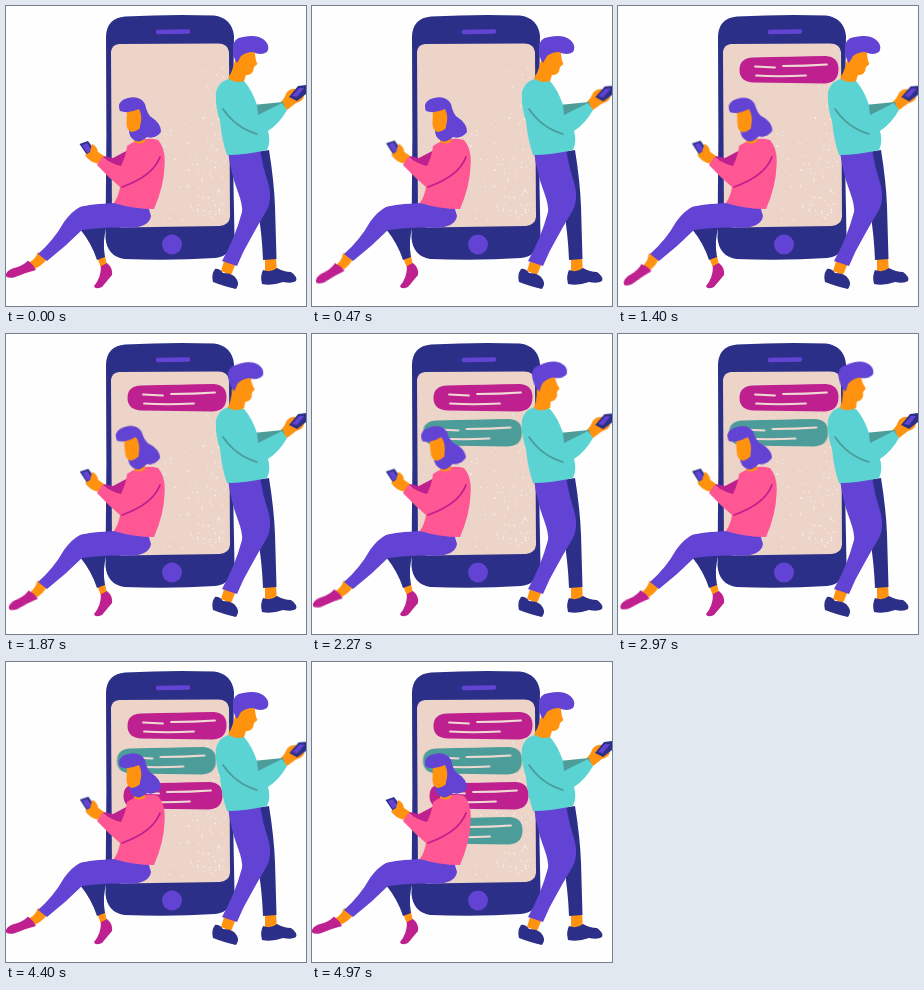
These frames come from a looping animation (300x300 px, 5010 ms). An HTML page:

```html
<!DOCTYPE html>
<html lang="en">
<head>
<meta charset="utf-8">
<title>Chatting by phone</title>
<style>
  html, body { margin: 0; width: 100%; height: 100%; overflow: hidden; background: #fefefe; }
  svg { display: block; width: 100vw; height: 100vh; }
  .navy { fill: #2c2f87; }
  .violet { fill: #6343d3; }
  .skin { fill: #ff930f; }
  .pink { fill: #ff5793; }
  .teal { fill: #5ad3d2; }
  .magenta { fill: #bf208f; }
  .sea { fill: #4c9d99; }
  .line { fill: none; stroke-linecap: round; stroke-linejoin: round; }
  .text { stroke: #f0d9d2; stroke-width: 1.8; }

  .move { animation: 5010ms ease-in-out infinite; }
  .foot { transform-origin: 36px 251px; animation-name: foot; }
  .her-head { transform-origin: 132px 133px; animation-name: herHead; }
  .his-head { transform-origin: 232px 74px; animation-name: hisHead; }
  .her-hands { transform-origin: 95px 155px; animation-name: type; animation-duration: 835ms; }
  .his-hands { transform-origin: 279px 101px; animation-name: type; animation-duration: 1002ms; }
  .bubble { animation: 5010ms ease-out infinite; transform-origin: 220px 64px; }
  .bubble.sea { transform-origin: 122px 64px; }
  .b1 { animation-name: pop1; }
  .b2 { animation-name: pop2; }
  .b3 { animation-name: pop3; }
  .b4 { animation-name: pop4; }

  @keyframes foot {
    0%, 87.8%, 100% { transform: rotate(0deg); }
    17.4% { transform: rotate(-19deg); }
    27.9% { transform: rotate(-15deg); }
    45.3% { transform: rotate(-3deg); }
    71.3% { transform: rotate(-10deg); }
  }
  @keyframes herHead {
    0%, 17.4%, 87.8%, 100% { transform: rotate(0deg); }
    27.9% { transform: rotate(-4deg); }
    45.3% { transform: rotate(-7deg); }
    71.3% { transform: rotate(-6deg); }
  }
  @keyframes hisHead {
    0%, 27.9%, 86%, 100% { transform: rotate(0deg); }
    43%, 56% { transform: rotate(-12deg); }
    71.3% { transform: rotate(-7deg); }
  }
  @keyframes type {
    0%, 100% { transform: rotate(0deg); }
    50% { transform: rotate(2deg); }
  }
  @keyframes pop1 { 0%, 14% { transform: scale(0); } 18.5%, 100% { transform: none; } }
  @keyframes pop2 { 0%, 39% { transform: scale(0); } 43.5%, 100% { transform: none; } }
  @keyframes pop3 { 0%, 64% { transform: scale(0); } 68.5%, 100% { transform: none; } }
  @keyframes pop4 { 0%, 89% { transform: scale(0); } 93.5%, 100% { transform: none; } }
</style>
</head>
<body>
<svg viewBox="0 0 300 300">
  <defs>
    <g id="bubble">
      <path d="M135 51.500Q175 50.500 208 50Q221 51 220.500 64Q220 76.500 207 77.500L136 76.500Q121.500 76 121.500 64Q121.500 52 135 51.500Z"/>
      <path class="line text" d="M137 60.500L157 61.500M165 60Q188 60 209 58.500M138 69.500Q160 71 188 69.500"/>
    </g>
  </defs>

  <!-- big phone -->
  <path class="navy" d="M100 30Q101 12 119 10.500Q165 8 208 9.500Q226 12 228 30Q226 130 228.500 230Q227 250 209 252Q165 255 118 253Q101 250 99.500 232Q101 130 100 30Z"/>
  <path fill="#ecd4c9" d="M105 46Q106 38.500 113 38L212 37.500Q222 37.500 223 46L224 211Q223 219 214 220L115 221.500Q107 221 106 214Z"/>
  <path class="line" stroke="#6343d3" stroke-width="4.500" d="M152 26L182 25.500"/>
  <circle class="violet" cx="166" cy="238.500" r="10"/>
  <g id="specks" fill="#fff"></g>

  <g><g class="bubble magenta b1"><use href="#bubble"/></g></g>
  <g transform="translate(-10.500 35)"><g class="bubble sea b2"><use href="#bubble"/></g></g>
  <g transform="translate(-4 70)"><g class="bubble magenta b3"><use href="#bubble"/></g></g>
  <g transform="translate(-10 105)"><g class="bubble sea b4"><use href="#bubble"/></g></g>

  <!-- woman -->
  <path class="skin" d="M91 251L99 250L101 259L95 262Z"/>
  <path class="magenta" d="M95 260L101 257Q107 262 106 269Q101 275 96 281Q89 284 88 280Q95 272 95 260Z"/>
  <path class="navy" d="M74 218L101 218Q96 235 99 251L91 254Q86 238 74 223Z"/>
  <g class="move foot">
    <path class="skin" d="M32 246L41 253Q36 260 28 263L22 257Q29 254 32 246Z"/>
    <path class="magenta" d="M22 254.500Q27 258 30 264Q18 267 8 271.500Q-1 273 0 268Q2 263 10 261.500Q18 259 22 254.500Z"/>
  </g>
  <path class="violet" d="M110 197Q84 198 74 201Q66 205 58 216Q48 234 32 248L41 255Q60 240 76 224Q95 221 118 221.500Q143 223 145 210L142 200Z"/>
  <path class="magenta" d="M93 149L107 152L124 143L127 158L116 164Z"/>
  <g class="move her-hands">
    <path class="navy" d="M73.500 138L82 135L90 146L82 150.500Z"/>
    <path class="violet" d="M76 139L81 137L86 144L81 147Z"/>
    <path class="skin" d="M79 149L84 146L86 138Q91 140 92 146L98 150L93 158Q83 156 79 149Z"/>
  </g>
  <path class="pink" d="M121 140Q136 130 152 134Q160 143 158.500 160Q158 180 148 203Q127 203 108 197Q113 189 114 181Q102 171 91 159L96 151Q106 158 115 160Q120 150 121 140Z"/>
  <path class="line" stroke="#bf208f" stroke-width="1.800" d="M154 151Q147 170 116 181"/>
  <g class="move her-head">
    <path class="skin" d="M128 120L138 116L139 136Q133 139 128 136Z"/>
    <path class="violet" d="M123 124Q130 124 136 117L145 111Q155 117 155 126Q150 133 141 131Q133 138 128 134Q123 131 123 124Z"/>
    <path class="skin" d="M121 103L137 102L137 117Q134 125 126 126Q120 125 120.500 116Z"/>
    <path class="violet" d="M114 105Q110 95 122 92Q134 89 139 98Q141 108 146 112Q155 118 154 126Q150 133 141 131Q133 130 134 120Q137 110 133 103Q122 108 114 105Z"/>
  </g>

  <!-- man -->
  <path class="skin" d="M259 252L270 252L271 266L259 267Z"/>
  <path class="navy" d="M257 264Q265 267 271 262Q278 266 285 266Q292 271 290 275Q286 278 277 276Q266 280 256 278Q254 270 257 264Z"/>
  <path class="navy" d="M250 146L263 144Q268 175 269 200L270.500 253L257 254Q256 228 252 205Z"/>
  <path class="skin" d="M219 252L230 257L225 269L215 265Z"/>
  <path class="navy" d="M209 263Q213 262 217 267Q224 267 228 270Q235 277 230 283Q220 281 207 276Q205 268 209 263Z"/>
  <path class="violet" d="M222 146L254 144Q257 162 263 180Q266 194 261 204Q253 217 246 230Q237 245 231 260L216 255Q229 232 236 206Q237 200 232 186Q225 168 222 146Z"/>
  <g class="move his-hands">
    <path class="skin" d="M274 97Q279 92 281 86Q285 82 290 83L293 90L298 89Q298 95 290 97L281 104Z"/>
    <path class="navy" d="M283 91L292 80L300 79L300 88L291 95Z"/>
    <path class="violet" d="M286 90L293 82L298 82L291 91Z"/>
  </g>
  <path class="sea" d="M247 99L277 96L279 102L248 112Z"/>
  <path class="teal" d="M218 75Q228 69 238 75Q246 84 251 99L252 109L276 97L281 104Q273 118 262 125Q265 136 261 144Q240 149 221 149Q216 135 214 115Q209 100 210 86Q212 78 218 75Z"/>
  <path class="line" stroke="#4c9d99" stroke-width="1.800" d="M217 103Q230 122 251 128"/>
  <g class="move his-head">
    <path class="skin" d="M230 45L249 44Q249 54 251.500 58L248 61Q247 70 240 69L238 75Q229 78 222 72Q229 62 230 45Z"/>
    <path class="violet" d="M227 44Q226 32 237 31Q250 28 257 33Q265 39 261 46Q255 50 247 46Q240 46 235 50L231 57Q227 52 227 44Z"/>
  </g>
</svg>
<script>
  const specks = document.getElementById('specks');
  let seed = 7;
  const rand = () => (seed = seed * 16807 % 2147483647) / 2147483647;
  for (let i = 0; i < 190; i++) {
    const dot = document.createElementNS('http://www.w3.org/2000/svg', 'circle');
    const set = (name, value) => dot.setAttribute(name, value.toFixed(2));
    set('cx', 110 + Math.sqrt(rand()) * 110);
    set('cy', 44 + Math.sqrt(rand()) * 172);
    set('r', 0.3 + rand() * 0.5);
    set('opacity', 0.4 + rand() * 0.5);
    specks.append(dot);
  }
</script>
</body>
</html>
```
